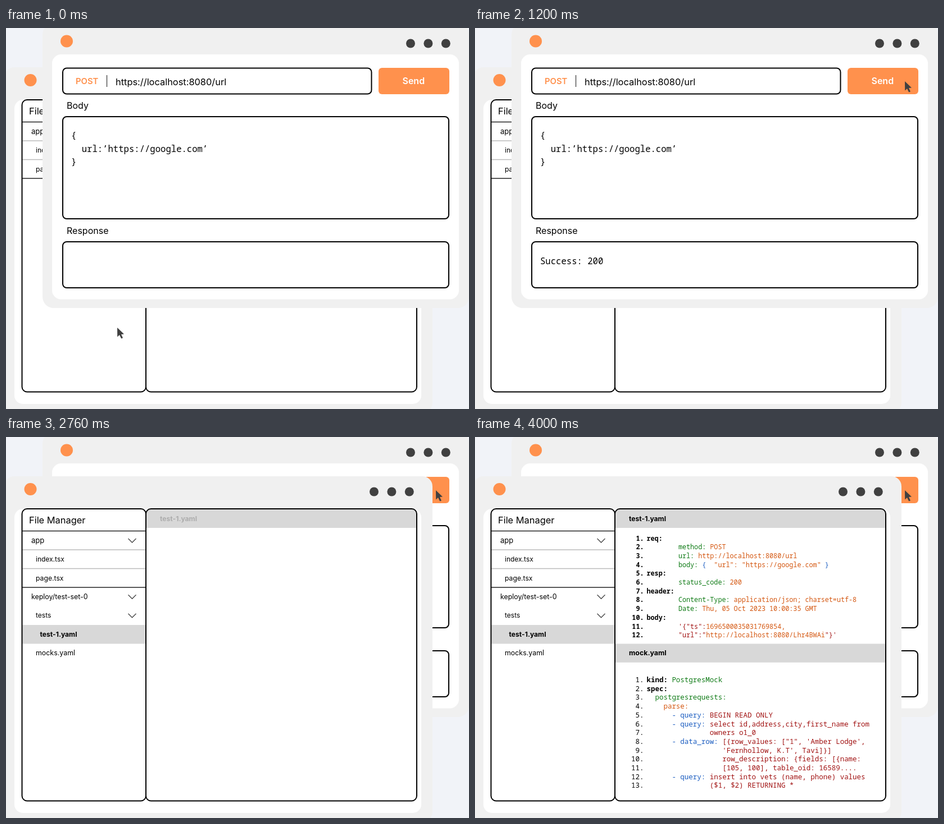
Recreate the animation shown at these times as an HTML page with a canvas. Size 824x679 px, loop 8 s.

```html
<!DOCTYPE html>
<html lang="en">
<head>
<meta charset="utf-8">
<title>Request recorder</title>
<style>
html, body { margin: 0; width: 100%; height: 100%; overflow: hidden; background: #f1f3f8; }
canvas { display: block; }
</style>
</head>
<body>
<canvas id="stage" width="824" height="679"></canvas>
<script>
const W = 824, H = 679, LOOP = 8000, STEP = 40;
const SANS = 'Inter, "Open Sans", sans-serif';
const MONO = '"Noto Sans Mono", "DejaVu Sans Mono", monospace';
const ORANGE = '#ff914d', FRAME = '#f0f0f0', DARK = '#404040', BAR = '#d8d8d8';
const INK = { k: '#000', g: '#0f7b16', o: '#d4560f', b: '#1a5cc0', r: '#a11212' };

const stage = document.getElementById('stage').getContext('2d');
const layer = document.createElement('canvas');
layer.width = W;
layer.height = H;
const layerCtx = layer.getContext('2d');
let c = stage;

// Each row: indent in characters, then colour / text pairs. Capital K is bold black.
const TEST_ROWS = [
  [0, 'K', 'req:'],
  [8, 'g', 'method: ', 'o', 'POST'],
  [8, 'g', 'url: ', 'o', 'http://localhost:8080/url'],
  [8, 'g', 'body: ', 'b', '{  ', 'o', '"url": "https://google.com"', 'b', ' }'],
  [0, 'K', 'resp:'],
  [8, 'g', 'status_code: ', 'o', '200'],
  [0, 'K', 'header:'],
  [8, 'g', 'Content-Type: ', 'o', 'application/json; charset=utf-8'],
  [8, 'g', 'Date: ', 'o', 'Thu, 05 Oct 2023 10:00:35 GMT'],
  [0, 'K', 'body:'],
  [8, 'r', '\'{"ts":', 'o', '1696500035031769854,'],
  [8, 'r', '"url":"', 'o', 'http://localhost:8080/Lhr4BWAi', 'r', '"}\'']
];
const MOCK_ROWS = [
  [0, 'K', 'kind: ', 'g', 'PostgresMock'],
  [0, 'K', 'spec:'],
  [2, 'g', 'postgresrequests:'],
  [4, 'o', 'parse:'],
  [6, 'b', '- query: ', 'r', 'BEGIN READ ONLY'],
  [6, 'b', '- query: ', 'r', 'select id,address,city,first_name from'],
  [15, 'r', 'owners o1_0'],
  [6, 'b', '- data_row: ', 'r', '[{row_values: ["1", \'Amber Lodge\','],
  [18, 'r', '\'Fernhollow, K.T\', Tavi]}]'],
  [18, 'r', 'row_description: {fields: [{name:'],
  [18, 'r', '[105, 100], table_oid: 16589....'],
  [6, 'b', '- query: ', 'r', 'insert into vets (name, phone) values'],
  [15, 'r', '($1, $2) RETURNING *']
];

const ramp = (t, from, to) => Math.min(1, Math.max(0, (t - from) / (to - from)));

function box(x, y, x2, y2, r, fill, stroke) {
  c.beginPath();
  c.roundRect(x, y, x2 - x, y2 - y, r);
  if (fill) { c.fillStyle = fill; c.fill(); }
  if (stroke) { c.strokeStyle = stroke; c.lineWidth = 2; c.stroke(); }
}

function path(points, color, width) {
  c.beginPath();
  points.forEach(([x, y]) => c.lineTo(x, y));
  c.strokeStyle = color;
  c.lineWidth = width;
  c.stroke();
}

function dot(x, y, r, color) {
  c.beginPath();
  c.arc(x, y, r, 0, 2 * Math.PI);
  c.fillStyle = color;
  c.fill();
}

function label(str, x, y, size, weight = 400, color = '#000', family = SANS) {
  c.font = `${weight} ${size}px ${family}`;
  c.fillStyle = color;
  c.fillText(str, x, y);
}

function faded(alpha, draw) {
  if (alpha <= 0) return;
  c.save();
  c.globalAlpha *= alpha;
  draw();
  c.restore();
}

function titleBar(x, y, dotsX, dotsY) {
  dot(x, y, 11, ORANGE);
  for (let i = 0; i < 3; i++) dot(dotsX + i * 31.4, dotsY, 8, DARK);
}

function listing(rows, y, size, numberWeight) {
  rows.forEach(([indent, ...parts], i) => {
    const base = y + i * 15.7;
    c.textAlign = 'right';
    label(i + 1 + '.', 300.5, base, size, numberWeight, '#000', MONO);
    c.textAlign = 'left';
    let x = 305.5 + indent * size * 0.6;
    for (let p = 0; p < parts.length; p += 2) {
      const bold = parts[p] === 'K';
      label(parts[p + 1], x, base, size, bold ? 700 : 400, INK[parts[p].toLowerCase()], MONO);
      x += parts[p + 1].length * size * 0.6;
    }
  });
}

function chevron(y) {
  path([[217.5, y - 3.5], [224.5, y + 3.5], [231.5, y - 3.5]], '#444', 1.3);
}

function requestWindow(t) {
  box(65, -8, 824, 499, 20, FRAME);
  titleBar(108, 23.5, 720, 27.5);
  box(82, 47, 806, 483.5, 16, '#fff');

  box(101, 71.5, 650.5, 117.5, 7, '#fff', '#000');
  label('POST', 124, 100.3, 14.8, 600, ORANGE);
  path([[179.5, 84], [179.5, 105]], '#555', 1.5);
  label('https://localhost:8080/url', 195, 102, 16.4);

  box(663, 71, 789, 118, 6, ORANGE);
  const press = Math.sin(Math.PI * ramp(t, 880, 1200));
  faded(press * 0.12, () => box(663, 71, 789, 118, 6, '#000'));
  label('Send', 705.5, 100.3, 16, 600, '#fff');

  label('Body', 108, 144, 16);
  box(101, 158, 788, 340, 7, '#fff', '#000');
  ['{', '  url:’https://google.com’', '}'].forEach((s, i) =>
    label(s, 116, 197 + i * 23.7, 15.6, 400, '#000', MONO));

  label('Response', 108, 366.5, 16);
  box(101, 381, 788, 463, 7, '#fff', '#000');
  faded(ramp(t, 880, 1200), () =>
    label('Success: 200', 116, 421, 15.6, 400, '#000', MONO));
}

function fileTree(t) {
  label('File Manager', 41, 154.3, 16.4);
  label('app', 45, 188.5, 13);
  chevron(184.5);
  label('index.tsx', 53, 222, 12);
  label('page.tsx', 53, 255.5, 12.2);
  [167.5, 201, 234.5, 268].forEach((y, i) =>
    path([[29, y], [249, y]], i % 3 ? '#bbb' : '#222', 1.3));

  faded(ramp(t, 2240, 2400), () => {
    c.fillStyle = BAR;
    c.fillRect(29, 335, 220, 33.5);
    label('keploy/test-set-0', 45, 289, 12.4);
    chevron(284.8);
    label('tests', 53, 322.3, 12);
    chevron(318.3);
    label('test-1.yaml', 60.5, 355.8, 12.1, 700);
    label('mocks.yaml', 53, 389.3, 12.4);
  });
}

function editor(t) {
  box(249.5, 128, 731, 162, [9, 9, 0, 0], BAR);
  faded(ramp(t, 2720, 2920), () => label('test-1.yaml', 274, 149.7, 12.1, 700));
  faded(ramp(t, 3040, 3320), () => listing(TEST_ROWS, 184.5, 11.75, 700));
  faded(ramp(t, 3440, 3680), () => {
    c.fillStyle = BAR;
    c.fillRect(250, 368.5, 481, 33.3);
    label('mock.yaml', 274, 389.3, 12.4, 700);
  });
  faded(ramp(t, 3680, 4000), () => listing(MOCK_ROWS, 437, 12.47, 400));
}

function fileWindow(t) {
  box(-3, 70, 759, 686, 18, FRAME);
  titleBar(43.5, 93, 655, 97.5);
  box(15, 128, 739, 670, 15, '#fff');
  fileTree(t);
  editor(t);
  box(28.5, 128, 249, 648.5, 9, null, '#000');
  box(249, 128, 731, 648.5, 9, null, '#000');
}

function pointer(t) {
  const p = ramp(t, 0, 753);
  c.save();
  c.translate(198 + 567 * p, 534 - 439 * p);
  c.beginPath();
  [[0, 0], [0.2, 16.5], [4, 13], [7.2, 19.5], [10, 18.2], [7, 12], [12, 11.5]]
    .forEach(([x, y]) => c.lineTo(x, y));
  c.fillStyle = DARK;
  c.fill();
  c.restore();
}

function render(t) {
  c = layerCtx;
  c.clearRect(0, 0, W, H);
  fileWindow(t);

  c = stage;
  c.fillStyle = '#f1f3f8';
  c.fillRect(0, 0, W, H);
  const raised = ramp(t, 1640, 1800);
  if (raised < 1) c.drawImage(layer, 0, 0);
  requestWindow(t);
  faded(raised, () => c.drawImage(layer, 0, 0));
  pointer(t);
}

function tick(now) {
  render(Math.floor((now % LOOP) / STEP) * STEP);
  requestAnimationFrame(tick);
}
requestAnimationFrame(tick);
</script>
</body>
</html>
```
